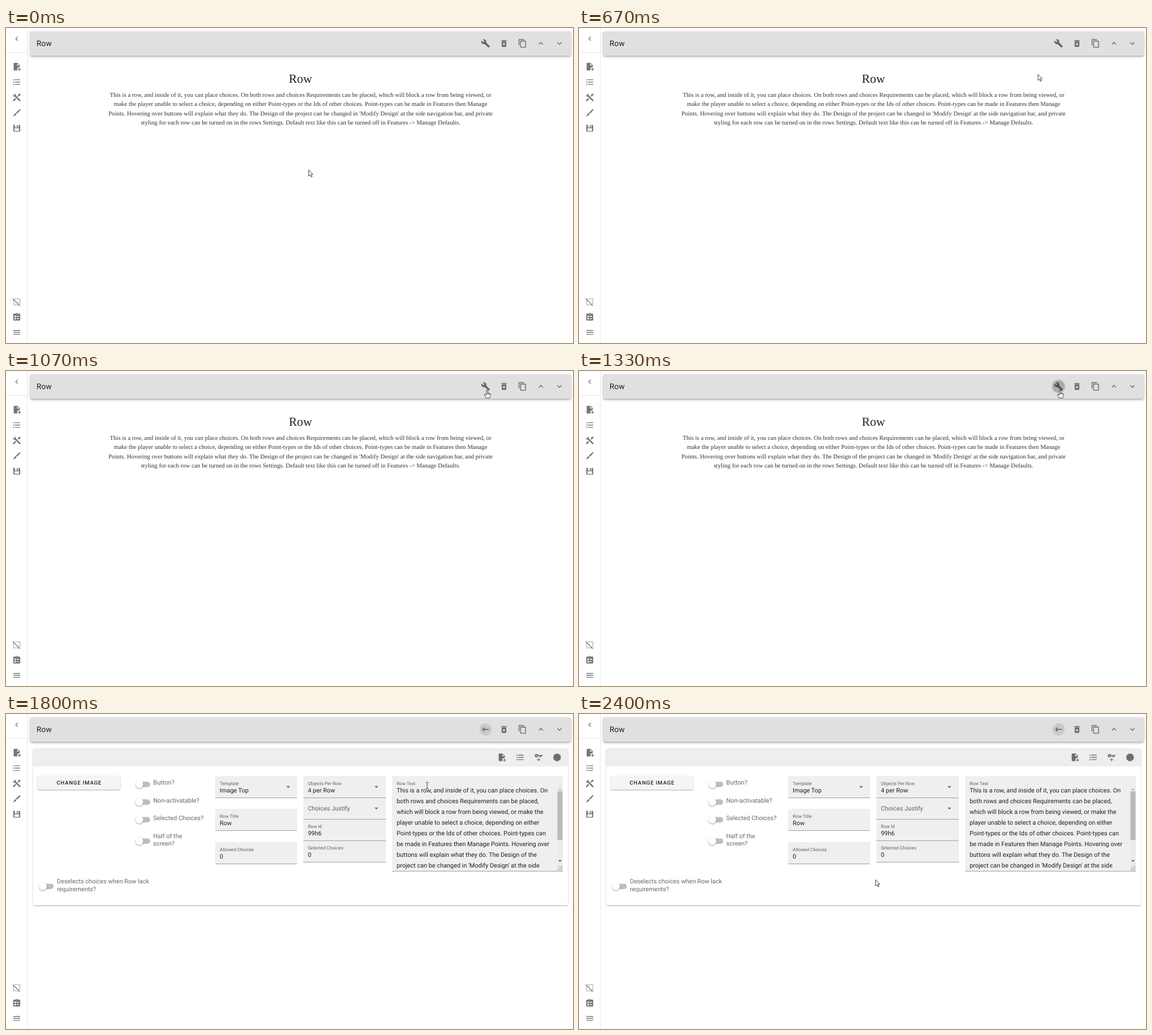
An HTML page for the animation above (3190 ms loop, 1003x558 px).

```html
<!DOCTYPE html>
<html lang="en">
<head>
<meta charset="utf-8">
<title>Row editor</title>
<style>
html, body { margin: 0; width: 100%; height: 100%; overflow: hidden; background: #fff; }
body { position: relative; }
div { position: absolute; border-radius: 2.7px; }
svg { position: absolute; left: 0; top: 0; }
text { font-family: Roboto, sans-serif; text-rendering: geometricPrecision; white-space: pre; }
.serif { font-family: "Liberation Serif", "Times New Roman", serif; text-anchor: middle; }
.bar { left: 43px; top: 6px; width: 956px; height: 43px; background: #e0e0e0;
  box-shadow: 0 1.4px 2.7px -.7px #0003, 0 2.7px 3.4px #00000024, 0 .7px 6.8px #0000001f; }
.card { left: 48px; top: 61px; width: 946px; height: 278px;
  background: linear-gradient(#eee 32px, #fff 32px);
  box-shadow: 0 .7px 1.4px #0000004d, 0 .7px 3.4px #0000001f; }
.button { left: 8px; top: 48.5px; width: 146px; height: 24.5px; background: #f5f5f5;
  box-shadow: 0 .7px 1.4px #0000004d, 0 .7px 3.4px #0000001f; }
.thumb { fill: #fff; filter: drop-shadow(0 1px 1.2px #0006); }
</style>
</head>
<body>
<div class="bar"></div>
<div class="card" id="card"><div class="button"></div></div>
<svg width="1003" height="558" viewBox="0 0 1003 558">
  <path d="M37.9 0V558M0 43.4H37.5" stroke="#e0e0e0" stroke-width=".8"/>
  <circle id="outer" cx="848.3" cy="27.3"/>
  <circle id="inner" cx="848.3" cy="27.3"/>
  <g id="base"></g>
  <g id="preview"></g>
  <g id="editor"></g>
  <path id="cursor" fill="#fff" stroke="#222" stroke-width=".85" stroke-linejoin="round"/>
</svg>
<script>
const $ = id => document.getElementById(id);

// Icons on a 24 unit grid
const icons = {
  left: "M15.41 16.58L10.83 12L15.41 7.41L14 6L8 12L14 18Z",
  up: "M7.41 15.41L12 10.83L16.59 15.41L18 14L12 8L6 14Z",
  down: "M7.41 8.58L12 13.17L16.59 8.58L18 10L12 16L6 10Z",
  drop: "M7 10L12 15L17 10Z",
  back: "M21 11H6.83L10.41 7.41L9 6L3 12L9 18L10.41 16.58L6.83 13H21Z",
  wrench: "M22.7 19L13.6 9.9C14.5 7.6 14 4.9 12.1 3C10.1 1 7.1 .6 4.7 1.7L9 6L6 9L1.6 4.7C.4 7.1 .9 10.1 2.9 12.1C4.8 14 7.5 14.5 9.8 13.6L18.9 22.7C19.3 23.1 19.9 23.1 20.3 22.7L22.6 20.4C23.1 20 23.1 19.3 22.7 19Z",
  trash: "M6 19A2 2 0 0 0 8 21H16A2 2 0 0 0 18 19V7H6ZM8.46 11.88L9.87 10.47L12 12.59L14.12 10.47L15.53 11.88L13.41 14L15.53 16.12L14.12 17.53L12 15.41L9.88 17.53L8.47 16.12L10.59 14ZM15.5 4L14.5 3H9.5L8.5 4H5V6H19V4Z",
  copy: "M19 21H8V7H19ZM19 5H8A2 2 0 0 0 6 7V21A2 2 0 0 0 8 23H19A2 2 0 0 0 21 21V7A2 2 0 0 0 19 5ZM16 1H4A2 2 0 0 0 2 3V17H4V3H16Z",
  add: "M14 2H6A2 2 0 0 0 4 4V20A2 2 0 0 0 6 22H13.81A6 6 0 0 1 20 13.08V8ZM13 9V3.5L18.5 9ZM23 20H20V23H18V20H15V18H18V15H20V18H23Z",
  list: [6, 12, 18].map(y => `M2.5 ${y}a1.5 1.5 0 1 1 3 0a1.5 1.5 0 1 1-3 0M7 ${y - 1}H21v2H7z`).join(""),
  tools: "M21.71 20.29L20.29 21.71A1 1 0 0 1 18.88 21.71L7 9.85A4 4 0 0 1 2.22 4.7L4.76 7.24L7.24 4.76L4.7 2.22A4 4 0 0 1 9.85 7L21.71 18.88A1 1 0 0 1 21.71 20.29M2.29 18.88A1 1 0 0 0 2.29 20.29L3.71 21.71A1 1 0 0 0 5.12 21.71L10.59 16.25L7.76 13.42ZM20 2L16 4V6L13.83 8.17L15.83 10.17L18 8H20L22 4Z",
  brush: "M20.5 2.2L22 3.8Q16 11 12.6 14.2L10 11.6Q14 7.5 20.5 2.2M9 12.8L11.4 15.2Q9.5 19.5 2 21.5Q4.5 19.5 5 17Q6 13.5 9 12.8Z",
  save: "M5 3A2 2 0 0 0 3 5V19A2 2 0 0 0 5 21H19A2 2 0 0 0 21 19V5.5L18.5 3H17V9A1 1 0 0 1 16 10H8A1 1 0 0 1 7 9V3ZM12 4V9H15V4ZM7 12H17A1 1 0 0 1 18 13V19H6V13A1 1 0 0 1 7 12Z",
  deselect: "M1 4.27L2.28 3L21 21.72L19.73 23L17 20.27V21H15V19H15.73L5 8.27V9H3V7H3.73ZM19 3h1a1 1 0 0 1 1 1v1h-2zM5 21H4a1 1 0 0 1-1-1v-1h2z" +
    [7, 11, 15].map(p => `M${p} 3h2v2h-2zM19 ${p}h2v2h-2z`).join("") +
    "M7 19h2v2H7zM11 19h2v2h-2zM3 11h2v2H3zM3 15h2v2H3z",
  clipboard: "M19 3H14.82A3 3 0 0 0 9.18 3H5A2 2 0 0 0 3 5V19A2 2 0 0 0 5 21H19A2 2 0 0 0 21 19V5A2 2 0 0 0 19 3M12 3a1 1 0 1 1 0 2a1 1 0 1 1 0-2M6 8h4v4H6zM6 14h4v4H6zM12 9h6v2h-6zM12 15h6v2h-6z",
  menu: "M3 6H21V8H3ZM3 11H21V13H3ZM3 16H21V18H3Z",
  key: "M6.5 3C8.46 3 10.13 4.25 10.74 6H22V9H18V12H15V9H10.74A4.5 4.5 0 1 1 6.5 3M6.5 6a1.5 1.5 0 1 0 0 3a1.5 1.5 0 1 0 0-3M8 17H11V14H13V17H16V19H13V22H11V19H8Z",
  seal: "M23 12L20.56 9.22L20.9 5.54L17.29 4.72L15.4 1.54L12 3L8.6 1.54L6.71 4.72L3.1 5.53L3.44 9.21L1 12L3.44 14.78L3.1 18.47L6.71 19.29L8.6 22.47L12 21L15.4 22.46L17.29 19.28L20.9 18.46L20.56 14.78Z"
};

const icon = (name, x, y) =>
  `<path d="${icons[name]}" fill="#0000008a" fill-rule="evenodd" transform="translate(${x} ${y}) scale(.681) translate(-12 -12)"/>`;
const text = (x, y, str, size = 10.9, fill = "#000000de", more = "") =>
  `<text x="${x}" y="${y}" font-size="${size}" fill="${fill}" ${more}>${str}</text>`;
const grey = "#00000099";
const toggle = (x, y, ...lines) =>
  `<rect x="${x - 5.4}" y="${y - 4.7}" width="24.4" height="9.5" rx="4.75" fill="#bdbdbd"/>
   <circle class="thumb" cx="${x}" cy="${y}" r="6.8"/>` +
  lines.map((s, i) => text(x + 24.6, y + (lines.length > 1 ? -5.4 : .8) + 13.5 * i, s, 10.9, grey)).join("");

// Input boxes: x, y, width, height, label, value, has drop arrow
const fields = [
  [370, 110, 145, 39, "Template", "Image Top", 1],
  [370, 168, 145, 39, "Row Title", "Row"],
  [370, 227, 145, 39, "Allowed Choices", "0"],
  [526, 110, 146, 39, "Objects Per Row", "4 per Row", 1],
  [526, 149, 146, 38, "", "", 1],
  [526, 187, 146, 38, "Row Id", "99h6"],
  [526, 225, 146, 38, "Selected Choices", "0"],
  [683, 110, 302, 169, "Row Text", ""]
];
const field = ([x, y, w, h, name, value, arrow], i) => {
  const base = y + h - 38.8;   // text hangs from the underline, except in the tall box
  const top = h > 40 ? y : base;
  return `<rect x="${x}" y="${y}" width="${w}" height="${h}" fill="#efefef"/>
   <rect id="line${i}" x="${x}" y="${y + h - 1}" width="${w}" height=".8"/>` +
    text(x + 8, top + 15.7, name, 8.17, grey) + text(x + 8, top + 29.2, value) +
    (arrow ? icon("drop", x + 129.2, top + 19) : "");
};

const notes = ["This is a row, and inside of it, you can place choices. On",
  "both rows and choices Requirements can be placed,",
  "which will block a row from being viewed, or make the",
  "player unable to select a choice, depending on either",
  "Point-types or the Ids of other choices. Point-types can",
  "be made in Features then Manage Points. Hovering over",
  "buttons will explain what they do. The Design of the",
  "project can be changed in 'Modify Design' at the side"];
const intro = ["This is a row, and inside of it, you can place choices. On both rows and choices Requirements can be placed, which will block a row from being viewed, or",
  "make the player unable to select a choice, depending on either Point-types or the Ids of other choices. Point-types can be made in Features then Manage",
  "Points. Hovering over buttons will explain what they do. The Design of the project can be changed in 'Modify Design' at the side navigation bar, and private",
  "styling for each row can be turned on in the rows Settings. Default text like this can be turned off in Features -&gt; Manage Defaults."];

$("base").innerHTML = icon("left", 19, 19) +
  ["add", "list", "tools", "brush", "save"].map((n, i) => icon(n, 19, 68.5 + 27.24 * i)).join("") +
  ["deselect", "clipboard", "menu"].map((n, i) => icon(n, 19, 485 + 27.1 * i)).join("") +
  ["trash", "copy", "up", "down"].map((n, i) => icon(n, 880.9 + 32.7 * i, 27.3)).join("") +
  text(54, 32.2, "Row", 13.7, "#000000de", 'letter-spacing=".17"');

$("preview").innerHTML = icon("wrench", 848.3, 27.3) +
  text(520.8, 97, "Row", 21.8, "#000000de", 'class="serif"') +
  intro.map((s, i) => text(521, 122 + 16.35 * i, s, 10.89, "#333", 'class="serif"')).join("");

$("editor").innerHTML = icon("back", 848.3, 27.3) +
  ["add", "list", "key", "seal"].map((n, i) => icon(n, 877 + 32.6 * i, 76.8)).join("") +
  text(129.4, 125.2, "CHANGE IMAGE", 9.53, "#000000de", 'font-weight="500" letter-spacing=".85" text-anchor="middle"') +
  toggle(236, 124.6, "Button?") + toggle(236, 156, "Non-activatable?") +
  toggle(236, 187.2, "Selected Choices?") + toggle(236, 225.2, "Half of the", "screen?") +
  toggle(65.4, 305.4, "Deselects choices when Row lack", "requirements?") +
  fields.map(field).join("") + text(534, 170.9, "Choices Justify", 10.9, grey) +
  notes.map((s, i) => text(691, 139 + 19.05 * i, s)).join("") +
  `<path d="M975 129H985V268H975Z" fill="#ebebeb"/>
   <path d="M975.5 137H984.6V223H975.5Z" fill="#bababa"/>
   <path d="M977.4 135L980 132.2L982.6 135Z" fill="#a3a3a3"/>
   <path d="M977.4 259L980 261.8L982.6 259Z" fill="#444"/>
   <path d="M975 268H985V278H975Z" fill="#e0e0e0"/>
   <path d="M977.5 276.5L984 270M981.5 276.5L984 274" stroke="#8a8a8a" stroke-width=".8"/>`;

const shapes = {
  arrow: "M0 0V10.8L2.5 8.5L4.3 12.5L6 11.8L4.3 7.9H7.5Z",
  hand: "M-1.1 1Q0-.6 1.1 1V5.2Q2 4.5 2.8 5.5Q3.7 4.9 4.4 6Q5.8 5.7 5.9 7.2V9.5Q5.8 11.5 4.7 12.3V13.8H-2V12.4Q-3.8 10.4-4.8 8Q-4.5 6.4-3 7.4L-1.1 8.8ZM1.1 5V7.3M2.8 5.5V7.5M4.4 6V7.7",
  beam: "M-2.4-5.4Q-.3-5.4 0-4.6Q.3-5.4 2.4-5.4M0-4.6V4.6M-2.4 5.4Q-.3 5.4 0 4.6Q.3 5.4 2.4 5.4"
};

// Pointer way points: tick, x, y
const way = [[3, 535.5, 251.5], [4, 553, 246], [6, 626.5, 216], [8, 722, 158], [10, 812, 82],
  [11, 835.7, 62.5], [13, 847.5, 43.2], [16, 851, 34], [23, 851, 34], [24, 838, 47],
  [27, 745, 126.5], [29, 655, 192], [31, 572, 251], [32, 555, 267], [34, 533, 287], [36, 524.6, 293.6]];

function pointer(k) {
  const i = way.findIndex(p => p[0] >= k);
  if (i < 0) return way[way.length - 1].slice(1);
  if (!i) return way[0].slice(1);
  const [a, b] = [way[i - 1], way[i]], u = (k - a[0]) / (b[0] - a[0]);
  return [a[1] + (b[1] - a[1]) * u, a[2] + (b[2] - a[2]) * u];
}

function over([x, y, w, h], k) {
  const [px, py] = pointer(k);
  return k >= 21 && px > x && px < x + w && py > y && py < y + h;
}

function disc(id, r, alpha) {
  $(id).setAttribute("r", r);
  $(id).setAttribute("fill-opacity", alpha);
}

function draw(now) {
  const k = Math.floor((now % 3190 + 4) * .015);   // 15 ticks a second
  const open = k >= 21, [x, y] = pointer(k);
  $("card").style.visibility = open ? "visible" : "hidden";
  $("preview").style.display = open ? "none" : "";
  $("editor").style.display = open ? "" : "none";
  disc("outer", open ? 16.3 : 13, k < 20 ? 0 : open ? .12 * Math.min(1, Math.max(0, (26 - k) / 3)) : .07);
  disc("inner", 10.8, k < 20 ? 0 : open ? .1 : .18);

  let shape = Math.hypot(x - 848.3, y - 27.3) < 16.5 ? "hand" : "arrow";
  fields.forEach((f, i) => {
    // The underline darkens with the time the pointer has rested on the box
    const hover = [1, 2, 3, 4].filter(d => over(f, k - d)).length / 4;
    $("line" + i).setAttribute("fill-opacity", .42 + .45 * hover);
    if (over(f, k)) shape = f[6] ? "hand" : "beam";
  });
  $("cursor").setAttribute("d", shapes[shape]);
  $("cursor").setAttribute("fill", shape == "beam" ? "none" : "#fff");
  $("cursor").setAttribute("transform", `translate(${x} ${y})`);
}

const start = performance.now();
function loop() {
  draw(performance.now() - start);
  requestAnimationFrame(loop);
}
loop();
</script>
</body>
</html>
```
